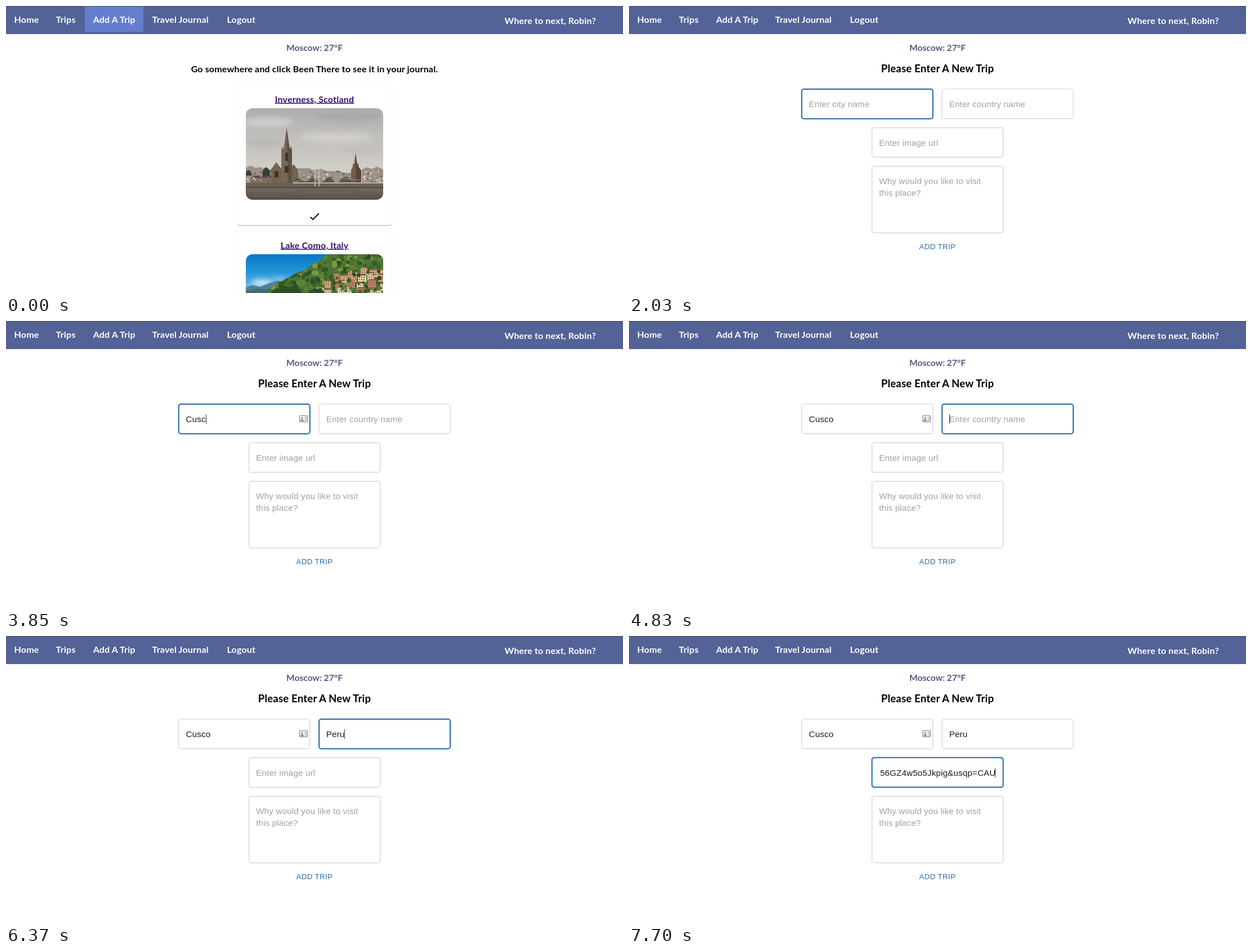
Write an HTML page that moves like this. It is 1096 px wide and 511 px high and loops after 8000 ms.

```html
<!DOCTYPE html>
<html lang="en">
<head>
<meta charset="utf-8">
<title>Trip planner</title>
<style>
  html, body { margin: 0; width: 100%; height: 100%; overflow: hidden; background: #fff; }
  svg { display: block; }
  .ui { font: 700 16px Lato, "Open Sans", sans-serif; letter-spacing: .2px; word-spacing: -.2px; }
  .mid { text-anchor: middle; }
  .nav { fill: #fff; }
  .title { font-size: 18.6px; }
  .temp { font-size: 15.6px; letter-spacing: 0; fill: #525987; }
  .link { fill: #36126e; text-decoration: underline; }
  .form { font: 15.2px "Liberation Sans", Arial, sans-serif; letter-spacing: .00938em; fill: #1c1c1c; }
  .hint { fill: #a0a0a0; }
  .btn { font-size: 13.3px; letter-spacing: .02857em; fill: #2d6ca4; }
  .card { fill: #fff; filter: drop-shadow(0 1.2px .6px rgba(0,0,0,.32)) drop-shadow(0 .5px 1px rgba(0,0,0,.08)); }
  .box { fill: none; stroke: #d2d2d2; stroke-width: 1.2; }
  .box.on { stroke: #2065a8; stroke-width: 2; }
</style>
</head>
<body>
<svg width="1096" height="511" viewBox="0 0 1096 511">
  <defs>
    <linearGradient id="cloudy" x2="0" y2="1">
      <stop stop-color="#adadac"/><stop offset=".35" stop-color="#bfbebb"/>
      <stop offset=".75" stop-color="#d0cdc9"/><stop offset="1" stop-color="#d6d3cf"/>
    </linearGradient>
    <linearGradient id="river" x2="0" y2="1">
      <stop stop-color="#70675f"/><stop offset="1" stop-color="#554d47"/>
    </linearGradient>
    <linearGradient id="blue" x2="0" y2="1">
      <stop stop-color="#0878c4"/><stop offset=".45" stop-color="#2594d8"/><stop offset="1" stop-color="#8ccaec"/>
    </linearGradient>
    <filter id="soft" x="-30%" y="-50%" width="160%" height="200%"><feGaussianBlur stdDeviation="5"/></filter>
    <clipPath id="photo1"><rect x="426" y="182" width="244" height="163" rx="12"/></clipPath>
    <clipPath id="photo2"><rect x="426" y="442" width="244" height="163" rx="12"/></clipPath>
    <path id="hill" d="M463 512q12-17 26-22 17-8 29-16 16-4 24-13 11-3 17-10l13-9h98v70z"/>
    <clipPath id="slope"><use href="#hill"/></clipPath>
    <clipPath id="urlClip"><rect x="444" y="230" width="209" height="26"/></clipPath>
  </defs>

  <rect width="1096" height="49" fill="#536297"/>
  <rect y="49" width="1096" height="1" fill="#5b6793"/>
  <rect width="1096" height="1" fill="#464b58"/>
  <rect id="hover" x="140" y="1" width="104" height="45" fill="#647dce"/>
  <g class="ui nav">
    <text x="14.5" y="29.5">Home</text>
    <text x="88.5" y="29.5">Trips</text>
    <text x="154.7" y="29.5">Add A Trip</text>
    <text x="259.5" y="29.5">Travel Journal</text>
    <text x="392.5" y="29.5">Logout</text>
    <text x="885.5" y="31.5">Where to next, Robin?</text>
  </g>
  <text class="ui mid temp" x="548" y="80">Moscow: 27°F</text>

  <g id="list">
    <text class="ui mid" x="548" y="118">Go somewhere and click Been There to see it in your journal.</text>
    <rect class="card" x="411" y="142" width="274" height="248" rx="4"/>
    <rect class="card" x="411" y="402" width="274" height="248" rx="4"/>
    <text class="ui mid link" x="548" y="171.5">Inverness, Scotland</text>
    <text class="ui mid link" x="548" y="431.5">Lake Como, Italy</text>
    <path transform="translate(536.6 363.5) scale(.95)" d="M9 16.17 4.83 12l-1.42 1.41L9 19 21 7l-1.41-1.41z"/>

    <g clip-path="url(#photo1)">
      <rect x="426" y="182" width="244" height="140" fill="url(#cloudy)"/>
      <g filter="url(#soft)">
        <ellipse cx="465" cy="207" rx="46" ry="9" fill="#cdccca"/>
        <ellipse cx="610" cy="196" rx="60" ry="8" fill="#a8a8a8"/>
        <ellipse cx="585" cy="234" rx="66" ry="10" fill="#d0cecb"/>
        <ellipse cx="460" cy="244" rx="38" ry="8" fill="#bbbab8"/>
        <ellipse cx="630" cy="256" rx="42" ry="6" fill="#c0bebb"/>
      </g>
      <path d="M426 288l8-4 9 4 10-1 9 5 12-2v28h-48zM505 293l8-4h26l6 3 14-2 12 4h20l12 3h10v21H505zM632 292l8-5 10 3 9-4 11 5v27h-38z" fill="#9a9087"/>
      <path d="M434 307l8-5h38l8 5v12h-54z" fill="#826c59"/>
      <path d="M440 302h39l5 4h-48z" fill="#554d49"/>
      <g id="town"></g>
      <path d="M456 303q-2-13 6-16 8 3 7 16zM426 302q0-10 5-10 6 4 6 10z" fill="#394035"/>
      <path d="M471 318v-27l9-13 10 13v27zM503 318v-29l8-7 8 10v26z" fill="#75624f"/>
      <path d="M489 318v-61l2-7 2 5 5.500-38 5.500 38 2-5 2 7v61z" fill="#7a6854"/>
      <path d="M498.500 217l5.500 38 2-5 2 7v61h-7z" fill="#5f5143"/>
      <path d="M496 261h5v15h-5zM495 285h7v12h-7zM477 294h7v11h-7z" fill="#393631"/>
      <path d="M613 316v-24l3-6v-6l2 3 3-21 3 21 2-3v6l5 7v23z" fill="#745b47"/>
      <path d="M621 262l3 21 2-3v6l5 7v23h-9z" fill="#54443a"/>
      <path d="M512 310q7-6 14 0t13-1 13 1 15-1 14 1 14-1 18 1v10H512z" fill="#555a49"/>
      <rect x="426" y="315" width="244" height="10" fill="#6a6154"/>
      <path d="M426 323.500h244" stroke="#443f39" stroke-width="2"/>
      <path d="M510 315h160" stroke="#b8b4ad" stroke-width="2"/>
      <path d="M510 314q22-2 39-22 4 14 7 0 28 20 114 19" fill="none" stroke="#b5b1aa" stroke-width=".7"/>
      <path d="M549 291v30M556 291v30" stroke="#c0bcb5" stroke-width="1.800"/>
      <rect x="426" y="324" width="244" height="22" fill="url(#river)"/>
      <path d="M432 330h74m20 2h90m12-3h38M440 338h54m36 2h100" stroke="#857a70" opacity=".5"/>
    </g>

    <g clip-path="url(#photo2)">
      <rect x="426" y="442" width="244" height="70" fill="url(#blue)"/>
      <g filter="url(#soft)" fill="#e9f3f7">
        <ellipse cx="455" cy="493" rx="18" ry="5"/><ellipse cx="486" cy="487" rx="13" ry="3" opacity=".6"/>
      </g>
      <path d="M426 501l12-4 13 3 15-6 16-5 18 3v20h-74z" fill="#537f99"/>
      <path d="M426 508l18-5 20 2 12-6 24-9v22h-74z" fill="#3d6e70"/>
      <use href="#hill" fill="#4c7432"/>
      <g clip-path="url(#slope)"><g id="trees"></g><g id="village"></g></g>
      <path d="M470 512q5-11 15-9 8-9 18-2 10-6 18 4l5 7zM541 512q4-12 13-8 7-6 12 8z" fill="#2b4f25"/>
    </g>
  </g>

  <g id="form">
    <text class="ui mid title" x="548" y="118">Please Enter A New Trip</text>
    <rect class="box" x="306.800" y="148" width="233" height="52.700" rx="4"/>
    <rect class="box" x="556.100" y="148" width="233" height="52.700" rx="4"/>
    <rect class="box" x="431.600" y="216.600" width="233" height="52.700" rx="4"/>
    <rect class="box" x="431.600" y="285.300" width="233" height="118.500" rx="4"/>
    <g class="form">
      <text class="entry" x="319.600" y="179.600"></text>
      <text class="entry" x="568.700" y="179.600"></text>
      <g clip-path="url(#urlClip)"><text class="entry" x="444.200" y="248.600"></text></g>
      <text class="hint" x="444.200" y="316.600">Why would you like to visit</text>
      <text class="hint" x="444.200" y="338.400">this place?</text>
      <text class="btn mid" x="548" y="433.200">ADD TRIP</text>
    </g>
    <g id="badge">
      <rect x="521.500" y="168.500" width="14" height="11" rx="1.500" fill="#fff" stroke="#999" stroke-width="1.600"/>
      <path d="M523.500 178q0-3 2.500-3t2.500 3zM530 171.500h4.500M530 174.200h4.500M530 177h4.500" fill="#999" stroke="#999" stroke-width="1.200"/>
      <circle cx="526" cy="172.600" r="1.900" fill="#999"/>
    </g>
    <rect id="caret" width="1" height="17" fill="#333"/>
  </g>
</svg>
<script>
const $ = id => document.getElementById(id);
const boxes = [...document.querySelectorAll(".box")];
const entries = [...document.querySelectorAll(".entry")];
const hints = ["Enter city name", "Enter country name", "Enter image url"];
const starts = [319.6, 568.7, 444.2];
const caretTops = [166, 166, 235];
const urlEnd = 651.4;
const url = "56GZ4w5o5Jkpig&usqp=CAU";
const LOOP = 8000;

// time, focused field, caret, city, country, image url
const steps = [
  [1470, 0, 1, "", "", ""],
  [1960, 0, 0, "", "", ""],
  [2520, 0, 1, "", "", ""],
  [3010, 0, 0, "", "", ""],
  [3290, 0, 1, "C", "", ""],
  [3570, 0, 1, "Cu", "", ""],
  [3640, 0, 1, "Cus", "", ""],
  [3850, 0, 1, "Cusc", "", ""],
  [4200, 0, 1, "Cusco", "", ""],
  [4760, 1, 1, "Cusco", "", ""],
  [5320, 1, 0, "Cusco", "", ""],
  [5740, 1, 1, "Cusco", "P", ""],
  [6020, 1, 1, "Cusco", "Pe", ""],
  [6160, 1, 1, "Cusco", "Per", ""],
  [6370, 1, 1, "Cusco", "Peru", ""],
  [6790, 2, 1, "Cusco", "Peru", ""],
  [7350, 2, 0, "Cusco", "Peru", ""],
  [7700, 2, 1, "Cusco", "Peru", url]
];

let seed = 11;
const rnd = () => (seed = seed * 16807 % 2147483647) / 2147483647;
const between = (a, b) => a + rnd() * (b - a);
const pick = list => list[Math.floor(rnd() * list.length)];

function rect(x, y, w, h, fill) {
  return `<rect x="${x.toFixed(1)}" y="${y.toFixed(1)}" width="${w}" height="${h}" fill="${fill}"/>`;
}

function blob(x, y, r, fill) {
  return `<circle cx="${x.toFixed(1)}" cy="${y.toFixed(1)}" r="${r.toFixed(1)}" fill="${fill}"/>`;
}

function drawTown() {
  const tones = ["#cfc8be", "#776d65", "#b5a99c", "#5f5853", "#dcd6cd"];
  let out = "";
  for (let i = 0; i < 90; i++) {
    const x = i < 25 ? between(427, 474) : i < 60 ? between(518, 610) : between(633, 668);
    out += rect(x, between(293, 312), 3, 2.5, pick(tones));
  }
  $("town").innerHTML = out;
}

function drawTrees() {
  const greens = ["#2c4f21", "#3d662a", "#5b8536", "#7d9a45", "#35592a"];
  let out = "";
  for (let i = 0; i < 190; i++)
    out += blob(between(466, 670), between(444, 511), between(2, 5.5), pick(greens));
  $("trees").innerHTML = out;
}

function house(x, y, w, h) {
  const wall = pick(["#cfa677", "#e0cba9", "#b98461", "#d3b08c", "#e6dcc8", "#a9755a"]);
  let out = rect(x, y, w, h, wall);
  out += `<path d="M${x - 1} ${y}l3-3h${w - 4}l3 3z" fill="${pick(["#a0614a", "#b37a58", "#8a5242"])}"/>`;
  for (let wy = y + 2; wy < y + h - 2; wy += 4)
    for (let wx = x + 2; wx < x + w - 1; wx += 4) out += rect(wx, wy, 1.5, 2, "#6d5646");
  return out;
}

function drawVillage() {
  let out = "";
  for (let row = 0; row < 4; row++) {
    const left = [608, 580, 566, 550][row];
    for (let x = left; x < 670; x += between(13, 23))
      out += house(Math.round(x), Math.round(between(464, 472) + row * 12), Math.round(between(10, 16)), 12);
  }
  for (let i = 0; i < 50; i++)
    out += blob(between(545, 670), between(470, 512), between(1.5, 4), pick(["#36602a", "#5a7d38", "#2a4a24"]));
  $("village").innerHTML = out;
}

let shown;
function setForm(step) {
  if (step === shown) return;
  shown = step;
  const [, focus, caret, ...values] = step;
  boxes.forEach((box, i) => box.classList.toggle("on", i === focus));
  entries.forEach((el, i) => {
    el.textContent = values[i] || hints[i];
    el.classList.toggle("hint", !values[i]);
    const atEnd = i === 2 && values[i];
    el.setAttribute("x", atEnd ? urlEnd : starts[i]);
    el.setAttribute("text-anchor", atEnd ? "end" : "start");
  });
  const width = values[focus] ? entries[focus].getComputedTextLength() : 0;
  $("caret").setAttribute("x", Math.round(Math.min(starts[focus] + width, urlEnd)));
  $("caret").setAttribute("y", caretTops[focus]);
  $("caret").setAttribute("opacity", caret);
}

function render(t) {
  const step = steps.filter(s => s[0] <= t).pop();
  $("list").style.display = step ? "none" : "";
  $("form").style.display = step ? "" : "none";
  $("hover").setAttribute("opacity", t < 1960 ? 1 : t < 2030 ? .5 : 0);
  $("badge").setAttribute("opacity", t < 2520 ? 0 : 1);
  if (step) setForm(step);
}

drawTown();
drawTrees();
drawVillage();
const begin = performance.now();
function tick() {
  render((performance.now() - begin) % LOOP);
  requestAnimationFrame(tick);
}
render(0);
requestAnimationFrame(tick);
</script>
</body>
</html>
```
